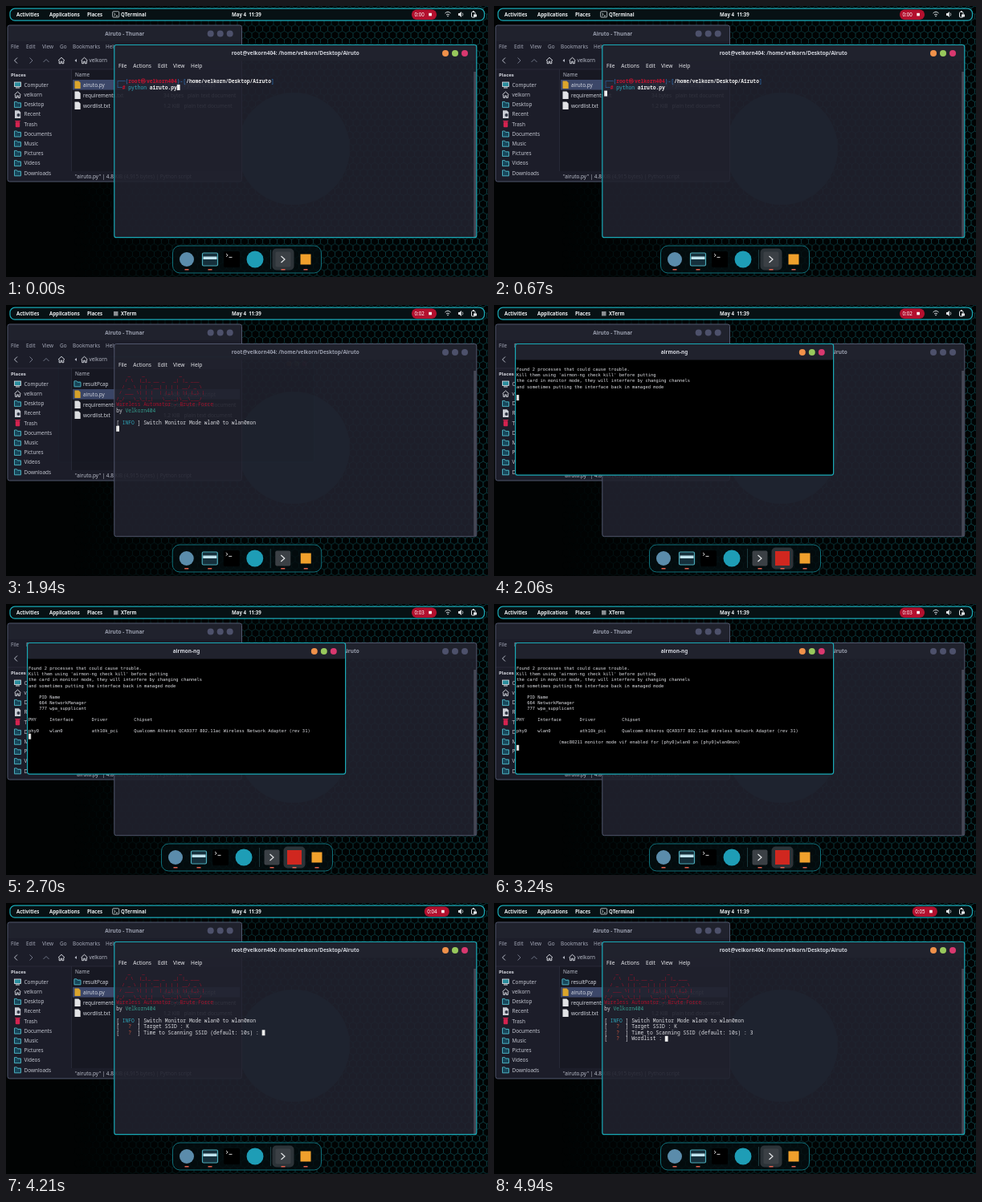
Animation, 600 px wide and 338 px high, one loop 5700 ms. Source, as an HTML page:

```html
<!DOCTYPE html>
<html lang="en">
<head>
<meta charset="utf-8">
<title>Airuto demo</title>
<style>
  html, body { margin: 0; width: 100%; height: 100%; overflow: hidden; background: #000; }
  svg { display: block; width: 100%; height: 100%; }
  text { font-family: "Noto Sans", sans-serif; white-space: pre; }
  .term { font-family: "Noto Sans Mono", monospace; font-size: 6.3px; }
  .xterm { font-family: "DejaVu Sans Mono", monospace; font-size: 5.455px; }
</style>
</head>
<body>
<svg id="stage" viewBox="0 0 600 338"></svg>
<script>
const LOOP = 5700, START = 1670, OPEN = 1940, CLOSE = 3550;
const CYAN = '#1aa9b6', TEAL = '#4aa9b8';
const MAIN = [0, OPEN, CLOSE, LOOP], POPUP = [OPEN, CLOSE];

// Shows its content while the time lies in one of the from/to pairs.
const show = (spans, svg) => `<g data-spans="${spans}">${svg}</g>`;
const rect = (x, y, w, h, fill, more = '') =>
  `<rect x="${x}" y="${y}" width="${w}" height="${h}" fill="${fill}" ${more}/>`;
const dot = (x, y, r, fill) => `<circle cx="${x}" cy="${y}" r="${r}" fill="${fill}"/>`;
const line = (d, stroke, width = 1) =>
  `<path d="${d}" fill="none" stroke="${stroke}" stroke-width="${width}"/>`;
const text = (x, y, s, fill = '#b9bdc9', size = 6.4, more = '') =>
  `<text x="${x}" y="${y + 2.3}" fill="${fill}" font-size="${size}" ${more}>${s}</text>`;
const bold = (x, y, s, fill, size, more = '') => text(x, y, s, fill, size, 'font-weight="600" ' + more);

const grid = (cls, x0, y0, dx, dy) => (col, row, s, fill = '#dcdde2', more = '') =>
  `<text class="${cls}" x="${x0 + col * dx}" y="${y0 + row * dy + 2.1}" fill="${fill}" ${more}>${s}</text>`;
const term = grid('term', 137.2, 86.5, 3.78, 7.53);
const xterm = grid('xterm', 28, 80.2, 3.284, 7.08);
const cursor = (col, row) => rect(137.2 + col * 3.78, 83 + row * 7.53, 3.8, 7, '#eee');
const xcursor = row => rect(28, 76.7 + row * 7.08, 3.2, 7, '#ddd');

function frame(x, y, w, h, title, active) {
  const mid = y + 10.5, right = x + w;
  const colours = active ? ['#f0914a', '#98c85c', '#d9386f'] : Array(3).fill('#4d516b');
  return rect(x, y, w, 20, '#20222d', 'rx="2.5"') +
    bold(x + w / 2, mid, title, active ? '#d3d6de' : '#9a9fae', 6.45, 'text-anchor="middle"') +
    colours.map((c, i) => dot(right - 38.8 + i * 12, mid, 4, c)).join('') +
    rect(x, y, w, h, 'none', `rx="2.5" stroke="${active ? CYAN : '#50566c'}" stroke-width="${active ? 1.2 : 1}"`);
}

const folder = (x, y) => rect(x - 4.5, y - 3, 8.5, 7, '#17465a') + line(`M${x - 4},${y + 3.5}v-7h3l1,1.5h4v5.5z`, TEAL, 1);
const sheet = (x, y, fill) => `<path d="M${x - 3.5},${y - 4.8}h5l2.2,2.2v7.4h-7.2z" fill="${fill}"/>`;
const house = (x, y) => line(`M${x - 4},${y}l4,-3.7l4,3.7M${x - 2.8},${y}v3.7h2v-2.5h1.6v2.5h2v-3.7`, '#d5d7de', 1);

function wallpaper() {
  return `<defs>
    <pattern id="hex" width="9" height="15.6" patternUnits="userSpaceOnUse">
      ${line('M0,2.6L4.5,0L9,2.6V7.8L4.5,10.4L0,7.8ZM4.5,10.4V15.6', '#0f535a', .7)}
    </pattern>
    <linearGradient id="fade"><stop offset=".14" stop-color="#000"/><stop offset=".45" stop-color="#aaa"/><stop offset="1" stop-color="#fff"/></linearGradient>
    <mask id="side">${rect(0, 0, 600, 338, 'url(#fade)')}</mask>
  </defs>` + rect(0, 0, 600, 338, '#010303') +
    rect(0, 0, 600, 338, 'url(#hex)', 'mask="url(#side)"') + dot(358, 178, 70, '#0a3139');
}

function topBar() {
  const wifi = line('M546.5,9q3.5,-3.4 7,0M548,11q2,-2 4,0', '#d5dade', 1) + dot(550, 12.6, .8, '#d5dade');
  const sound = '<path d="M563,9h1.6l2.2,-2v7l-2.2,-2h-1.6z" fill="#e4e7ea"/>' + line('M568,8.5q1.6,2 0,4', '#e4e7ea', .8);
  const battery = rect(579.5, 7.5, 4.5, 6.5, 'none', 'stroke="#e4e7ea" rx="1"') + rect(581, 6, 1.6, 1.2, '#e4e7ea') + rect(582, 10.5, 4, 3, '#e4e7ea');
  const label = (x, s) => bold(x, 10.7, s, '#eceff1', 6.1);
  return rect(5, 3.2, 590.5, 15, '#071114', `rx="6" stroke="${CYAN}" stroke-width="1.2"`) +
    label(13, 'Activities') + label(54, 'Applications') + label(101, 'Places') + label(281, 'May 4  11:39') +
    show(MAIN, rect(132.7, 6.8, 8, 7.2, 'none', 'rx="1" stroke="#d5dade" stroke-width=".8"') +
      line('M134.5,9l1.6,1.5l-1.6,1.5M137,12.2h2', '#fff', .8) + label(143, 'QTerminal')) +
    show(POPUP, rect(134, 8, 5.5, 5.5, '#8b9094') + label(143, 'XTerm')) +
    '<g id="recorder">' + rect(505, 4.6, 31, 12.4, '#b3102e', 'rx="6"') +
    `<text id="clock" x="508.5" y="13" fill="#fff" font-size="6.2"></text>` + rect(526.3, 8.8, 3.6, 3.6, '#fff') + '</g>' +
    show([0, CLOSE], wifi) + sound + battery;
}

function fileManager() {
  const places = ['Computer', 'velkorn', 'Desktop', 'Recent', 'Trash', 'Documents', 'Music', 'Pictures', 'Videos', 'Downloads'];
  const icons = [
    (x, y) => rect(x - 4, y - 3.5, 8, 5.5, '#2a8c9c', 'stroke="#dfe3e8" stroke-width=".8"') + rect(x - 2.5, y + 3, 5, 1, '#dfe3e8'),
    house, folder,
    (x, y) => sheet(x, y, '#c9ccd4') + dot(x + 1, y + 1, 2, '#333848'),
    (x, y) => rect(x - 2.7, y - 3, 5.4, 7, '#d3234f', 'rx="1"') + rect(x - 3.3, y - 4.3, 6.6, 1, '#d3234f')
  ];
  const sidebar = places.map((name, i) => {
    const y = 98.5 + i * 12.2;
    return (icons[i] || folder)(14.5, y) + text(22.5, y, name, '#c3c6d0');
  }).join('');
  const files = [['airuto.py', '#dba52c', '4.8 KiB   Python script'], ['requirements.txt', '#e2e3e6', '34 bytes   plain text document'], ['wordlist.txt', '#e2e3e6', '1.2 KiB   plain text document']];
  const rows = top => rect(83, top - 6.3, 208, 12.6, '#3c4769') + files.map(([name, colour, info], i) => {
    const y = top + i * 13;
    return sheet(89, y, colour) + text(96, y, name, '#d3d6df') + text(196, y, info, '#c3c6d0');
  }).join('');
  const menu = [[6, 'File'], [25, 'Edit'], [45, 'View'], [67, 'Go'], [83, 'Bookmarks'], [124, 'Help']];
  return rect(2, 24, 291.5, 195, '#1c1d29', 'rx="2.5"') + rect(82, 79, 211, 127, '#171822') +
    menu.map(([x, s]) => text(x, 51, s, '#a3a7b6')).join('') +
    line('M14,64.5l-3.5,3.5l3.5,3.5', '#b9bdc9') + line('M29.5,64.5l3.5,3.5l-3.5,3.5M46.5,70l3.5,-3.5l3.5,3.5', '#6f7485') +
    house(69, 68) + '<path d="M88,66v4l-2.5,-2z" fill="#b9bdc9"/>' + house(97.5, 68) + text(103.5, 68, 'velkorn') +
    line('M2,79H293M81.5,79V206', '#2b2d3b', .8) + bold(6, 86, 'Places', '#d5d7df', 6) + text(86, 85.5, 'Name') + sidebar +
    show([0, START], rows(98.3)) +
    show([START, LOOP], folder(89, 98.3) + text(96, 98.3, 'resultPcap', '#d3d6df') + rows(111.3)) +
    text(86, 212.4, '"airuto.py" | 4.8 KiB (4,915 bytes) | Python script') +
    frame(2, 24, 291.5, 195, 'Airuto - Thunar', false);
}

function terminal() {
  const banner = String.raw`
    _    _            _
   / \  (_)_ __ _   _| |_ ___
  / _ \ | | '__| | | | __/ _ \
 / ___ \| | |  | |_| | || (_) |
/_/   \_\_|_|   \__,_|\__\___/`.split('\n').slice(1);
  const title = 'root@velkorn404: /home/velkorn/Desktop/Airuto';
  const blue = '#2f7fd0', red = '#c4122f', cyan = '#2fa5b8';
  const menu = [[140, 'File'], [158.3, 'Actions'], [189, 'Edit'], [208, 'View'], [230, 'Help']];
  const strong = 'font-weight="700"';
  const tag = (row, s, mark, colour) => term(0, row, '[') + term(2, row, mark, colour) + term(7, row, '] ' + s);
  const ask = (row, s) => tag(row, s, '  ?', '#c8553d');
  const prompt = term(0, 1, '┌──(', blue) + term(4, 1, 'root㉿', red, strong) + term(10, 1, 'velkorn404', red, strong) +
    term(20, 1, ')-[', blue) + term(23, 1, '/home/velkorn/Desktop/Airuto', '#eee', strong) + term(51, 1, ']', blue) +
    term(0, 2, '└─', blue) + term(2, 2, '#', red, strong) + term(4, 2, 'python', cyan) + term(11, 2, 'airuto.py', '#eee', strong);
  const output = banner.map((s, i) => term(0, i, s, '#a5102a', 'style="font-size:5.95px"')).join('') +
    term(0, 5, 'Wireless Automator - Brute Force', '#a5102a') +
    term(0, 6, 'by') + term(3, 6, 'Velkorn404', '#35a08f') +
    tag(8, 'Switch Monitor Mode wlan0 to wlan0mon', 'INFO', cyan);
  return rect(134.8, 48.5, 451, 240.2, '#21222e', 'rx="2.5" fill-opacity=".9"') +
    rect(582.2, 82, 2.8, 206, '#454754') +
    menu.map(([x, s]) => text(x, 75, s, '#e6e7eb', 6.6)).join('') +
    show([0, START], prompt) + show([0, 520], cursor(20, 2)) + show([520, START], cursor(0, 3)) +
    show([START, LOOP], output) + show([START, CLOSE], cursor(0, 9)) +
    show([CLOSE, LOOP], ask(9, 'Target SSID :')) + show([CLOSE, 3940], cursor(23, 9)) +
    show([3940, LOOP], term(23, 9, 'K')) + show([3940, 4210], cursor(24, 9)) +
    show([4210, LOOP], ask(10, 'Time to Scanning SSID (default: 10s) :')) + show([4210, 4790], cursor(48, 10)) +
    show([4790, LOOP], term(48, 10, '3')) + show([4790, 4940], cursor(49, 10)) +
    show([4940, LOOP], ask(11, 'Wordlist :') + cursor(20, 11)) +
    show(MAIN, frame(134.8, 48.5, 451, 240.2, title, true)) +
    show(POPUP, frame(134.8, 48.5, 451, 240.2, title, false));
}

function popup() {
  const table = (row, cells) => cells.map((s, i) => xterm([0, 8, 24, 40][i], row, s)).join('');
  const found = ['Found 2 processes that could cause trouble.', "Kill them using 'airmon-ng check kill' before putting",
    'the card in monitor mode, they will interfere by changing channels', 'and sometimes putting the interface back in managed mode'];
  const processes = ['PID Name', '664 NetworkManager', '777 wpa_supplicant'];
  return show(POPUP, '<g id="popup">' + rect(26.6, 48.5, 396, 163.6, '#000', 'rx="2.5"') +
    show([2030, CLOSE], found.map((s, i) => xterm(0, i, s)).join('')) + show([2030, 2240], xcursor(5)) +
    show([2240, CLOSE], processes.map((s, i) => xterm(4, i + 5, s)).join('')) + show([2240, 2700], xcursor(8)) +
    show([2700, CLOSE], table(9, ['PHY', 'Interface', 'Driver', 'Chipset']) +
      table(11, ['phy0', 'wlan0', 'ath10k_pci', 'Qualcomm Atheros QCA9377 802.11ac Wireless Network Adapter (rev 31)'])) +
    show([2700, 3240], xcursor(12)) +
    show([3240, CLOSE], xterm(16, 13, '(mac80211 monitor mode vif enabled for [phy0]wlan0 on [phy0]wlan0mon)') + xcursor(14)) +
    frame(26.6, 48.5, 396, 163.6, 'airmon-ng', true) + '</g>');
}

function dock() {
  const mark = x => rect(x - 2.5, 328, 5, 1.5, '#e0614f');
  const glow = x => rect(x - 13.5, 302.5, 27, 27, '#2c3338', 'rx="5"');
  const left = dot(225, 316, 9, '#5b8cab') + mark(225) +
    rect(244.5, 308, 19, 16, '#16303c', `rx="1.5" stroke="${TEAL}" stroke-width="1.2"`) + rect(245.5, 312.5, 17, 3.5, '#bfe3ee') + mark(254) +
    rect(271, 306, 20, 20, '#000', 'rx="2"') + line('M274,309l2.2,1.8l-2.2,1.8M277.5,313.4h4', '#e8e8e8', .9) +
    dot(310, 316, 10.5, '#1e9db6') + line('M329.5,304V328', '#24474d', .8) +
    show(MAIN, glow(345)) + rect(335.5, 306.5, 19, 19, '#3b4045', 'rx="2"') + line('M342.5,312l4.5,4l-4.5,4', '#e4e6e8', 1.2) + mark(345);
  return `<rect id="dock" y="299" height="34" rx="9" fill="#040d10" fill-opacity=".85" stroke="#0f6e78"/>` +
    `<g data-shift="-14">${left}</g>` +
    `<g id="xicon">${show(POPUP, glow(359) + mark(359))}${rect(350, 307, 18, 18, '#d0271f')}</g>` +
    `<g data-shift="14">${rect(366.5, 309.5, 13, 13, '#f0a02c')}${mark(373)}</g>`;
}

const stage = document.getElementById('stage');
stage.innerHTML = wallpaper() + fileManager() + terminal() + popup() + dock() + topBar();
const byId = id => document.getElementById(id);
const [clock, recorder, popupEl, dockEl, xicon] = ['clock', 'recorder', 'popup', 'dock', 'xicon'].map(byId);
const timed = [...stage.querySelectorAll('[data-spans]')].map(el => [el, el.dataset.spans.split(',').map(Number)]);
const shifted = [...stage.querySelectorAll('[data-shift]')];

const easeOut = (t, from, length) => 1 - (1 - Math.min(1, Math.max(0, (t - from) / length))) ** 2;
const scaleAt = (x, y, k) => `translate(${x} ${y}) scale(${k}) translate(${-x} ${-y})`;

function draw() {
  const t = performance.now() % LOOP;
  for (const [el, spans] of timed) {
    const on = spans.some((from, i) => i % 2 === 0 && t >= from && t < spans[i + 1]);
    el.style.display = on ? '' : 'none';
  }
  clock.textContent = '0:0' + Math.floor((t + 300) / 1000);
  // The recorder pill takes the place of the wifi icon once that is gone.
  recorder.setAttribute('transform', `translate(${t < CLOSE ? 0 : 15.8} 0)`);

  const opened = easeOut(t, OPEN, 110);
  popupEl.setAttribute('transform', scaleAt(224, 130, .8 + .2 * opened));
  popupEl.setAttribute('opacity', opened);

  const wide = opened - easeOut(t, CLOSE, 150);
  dockEl.setAttribute('x', 207.5 - 14 * wide);
  dockEl.setAttribute('width', 185 + 28 * wide);
  shifted.forEach(el => el.setAttribute('transform', `translate(${el.dataset.shift * wide} 0)`));
  xicon.setAttribute('transform', scaleAt(359, 316, wide));
  xicon.setAttribute('opacity', wide);
  requestAnimationFrame(draw);
}
draw();
</script>
</body>
</html>
```
